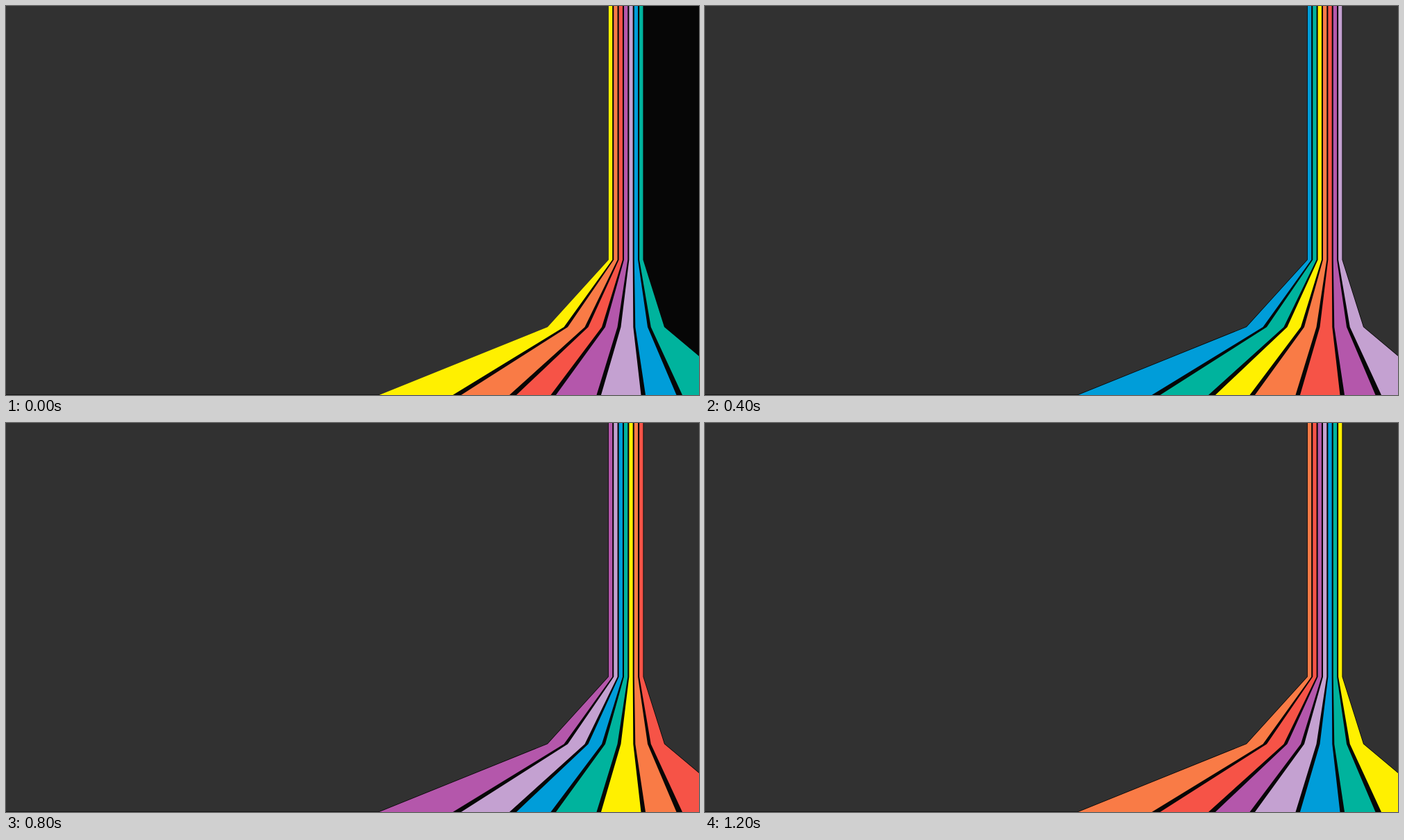
An HTML page that plays this animation: 998 by 561 pixels, repeating every 1400 ms.

```html
<!DOCTYPE html>
<html lang="en">
<head>
<meta charset="utf-8">
<title>Rainbow stripes</title>
<style>
  html, body { margin: 0; width: 100%; height: 100%; overflow: hidden; background: #060606; }
  svg { display: block; width: 100%; height: 100%; }
</style>
</head>
<body>
<svg id="stage" viewBox="0 0 998 561" preserveAspectRatio="none"></svg>
<script>
const STEP = 200;
const COLORS = ['#fff000', '#f97b46', '#f65347', '#b457ab', '#c4a1d1', '#009dd9', '#00b39d'];
const COUNT = COLORS.length;
const BLACK = '#060606', GREY = '#313131';

// Left and right edge of each stripe at the four heights where it bends.
const LEVELS = [0, 366, 463, 561];
const SHAFT = COLORS.map((_, i) => [867.9 + 7.37 * i, 873.2 + 7.37 * i]);
const KNEE = [[780, 803.5], [809, 833.5], [838.5, 858], [863, 880.5], [885.5, 903.3], [906.3, 924], [928.8, 948]];
const FOOT = [[537.5, 643.5], [655.5, 725], [735, 784.5], [792, 850.5], [857, 914.5], [921, 965.5], [974, 1064.7]];
const ROWS = [SHAFT, SHAFT, KNEE, FOOT];

const stage = document.getElementById('stage');

function add(tag, attrs) {
  const el = document.createElementNS('http://www.w3.org/2000/svg', tag);
  for (const name in attrs) stage.append(el), el.setAttribute(name, attrs[name]);
  return el;
}

// Outline from the left edge of stripe a to the right edge of stripe b.
function outline(a, b) {
  const left = ROWS.map((row, i) => [row[a][0], LEVELS[i]]);
  const right = ROWS.map((row, i) => [row[b][1], LEVELS[i]]).reverse();
  return [...left, ...right].join(' ');
}

function play(el, prop, values) {
  const frames = [...values, values[0]].map((value, i) => ({
    [prop]: value, offset: i / COUNT, easing: 'step-end'
  }));
  const anim = el.animate(frames, { duration: STEP * COUNT, iterations: Infinity });
  anim.startTime = document.timeline.currentTime;
}

add('rect', { width: 998, height: 561, fill: BLACK });
add('rect', { width: 890, height: 560.4, fill: GREY });
const side = add('rect', { x: 890, width: 108, height: 561, fill: BLACK });
play(side, 'fill', COLORS.map((_, i) => i ? GREY : BLACK));

const body = add('polygon', { points: outline(0, COUNT - 1), fill: BLACK, stroke: BLACK });
play(body, 'strokeWidth', COLORS.map((_, i) => i < 2 ? '0px' : '1.6px'));

COLORS.forEach((color, i) => {
  const stripe = add('polygon', { points: outline(i, i), fill: color });
  play(stripe, 'fill', COLORS.map((_, k) => COLORS[(i - k + COUNT) % COUNT]));
});
</script>
</body>
</html>
```
